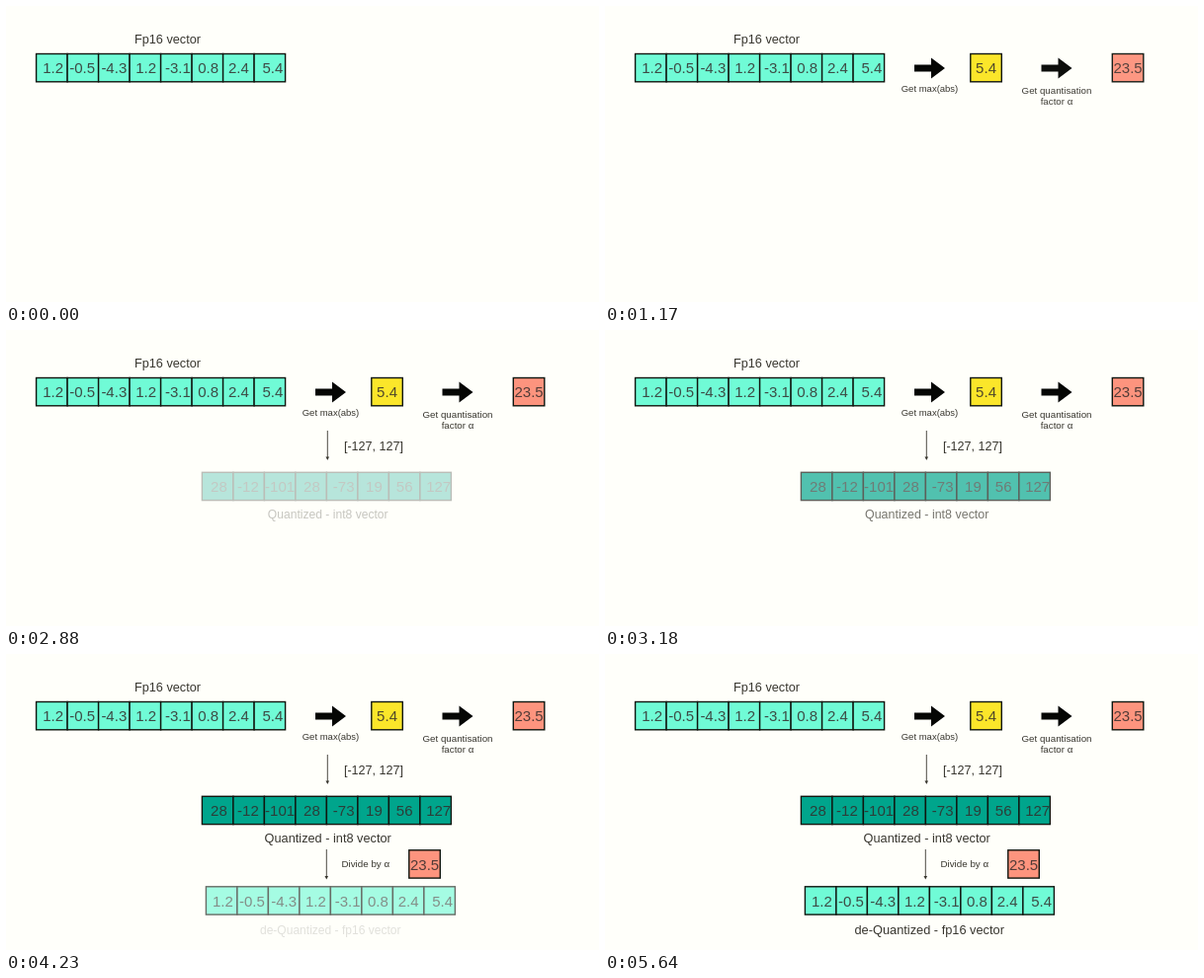
Animation, 600 px wide and 300 px high, one loop 5.67 s. Source, as an HTML page with a canvas:

```html
<!DOCTYPE html>
<html lang="en">
<head>
<meta charset="utf-8">
<title>Vector quantisation</title>
<style>
html, body { margin: 0; width: 100%; height: 100%; overflow: hidden; background: #fffffa; }
canvas { display: block; width: 600px; height: 300px; }
</style>
</head>
<body>
<canvas id="stage" width="600" height="300"></canvas>
<script>
const main = document.getElementById('stage');
const ctx = main.getContext('2d');
const LOOP = 5670;
const FONT = '"Liberation Sans", Arial, sans-serif';
const PAPER = '#fffffa', INK = '#38362f', EDGE = '#10160f', DIGIT = 'rgba(50, 44, 42, 0.85)';
const MINT = '#70fbd6', GREEN = '#00a58c', YELLOW = '#fbe62a', ORANGE = '#fd947e';
const CELL = 31.5, CELL_HEIGHT = 28.3;
const DIGIT_X = [17, 46.5, 78.7, 111, 143.3, 174, 204.8, 239.3];
const FLOATS = ['1.2', '-0.5', '-4.3', '1.2', '-3.1', '0.8', '2.4', '5.4'];
const INTS = ['28', '-12', '-101', '28', '-73', '19', '56', '127'];

function text(str, x, baseline, size, color = INK) {
  ctx.font = `${size}px ${FONT}`;
  ctx.fillStyle = color;
  ctx.fillText(str, x, baseline);
}

// Labels grow very slightly while they fade in.
function label(str, x, baseline, size, progress = 1) {
  const scale = 0.93 + 0.07 * progress;
  ctx.save();
  ctx.translate(x, baseline - size * 0.36);
  ctx.scale(scale, scale);
  text(str, 0, size * 0.36, size);
  ctx.restore();
}

function box(x, y, fill) {
  ctx.fillStyle = fill;
  ctx.fillRect(x, y, CELL, CELL_HEIGHT);
  ctx.strokeStyle = EDGE;
  ctx.lineWidth = 1.4;
  ctx.strokeRect(x, y, CELL, CELL_HEIGHT);
}

function vector(x, y, values, fill) {
  values.forEach((_, i) => box(x + i * CELL, y, fill));
  values.forEach((value, i) => text(value, x + DIGIT_X[i], y + 19.8, 15, DIGIT));
}

function scalar(x, y, value, fill) {
  box(x, y, fill);
  text(value, x + CELL / 2, y + 19.8, 15, DIGIT);
}

function blockArrow(x, y) {
  ctx.fillStyle = '#050604';
  ctx.beginPath();
  ctx.moveTo(x, y - 3.4);
  ctx.lineTo(x + 17, y - 3.4);
  ctx.lineTo(x + 17, y - 10.6);
  ctx.lineTo(x + 31, y);
  ctx.lineTo(x + 17, y + 10.6);
  ctx.lineTo(x + 17, y + 3.4);
  ctx.lineTo(x, y + 3.4);
  ctx.fill();
}

function downArrow(x, top, tip) {
  ctx.strokeStyle = ctx.fillStyle = INK;
  ctx.lineWidth = 0.9;
  ctx.beginPath();
  ctx.moveTo(x, top);
  ctx.lineTo(x, tip - 2);
  ctx.stroke();
  ctx.beginPath();
  ctx.moveTo(x - 1.8, tip - 3.5);
  ctx.lineTo(x + 1.8, tip - 3.5);
  ctx.lineTo(x, tip);
  ctx.fill();
}

// start and end of the fade, its curve, and what to draw
const steps = [
  [-1, 0, 1, () => {
    label('Fp16 vector', 163.5, 38.2, 12.7);
    vector(30.6, 48.5, FLOATS, MINT);
  }],
  [20, 580, 1, p => {
    blockArrow(313, 63);
    label('Get max(abs)', 328.5, 87.2, 9.5, p);
    scalar(369.8, 48.5, '5.4', YELLOW);
  }],
  [560, 1190, 1, p => {
    blockArrow(441.5, 63);
    label('Get quantisation', 457, 89, 9.75, p);
    label('factor α', 457, 99.7, 9.75, p);
    scalar(513.3, 48.5, '23.5', ORANGE);
  }],
  [1600, 2290, 1, p => {
    downArrow(325.3, 102, 132);
    label('[-127, 127]', 372, 121.7, 12.6, p);
  }],
  [2670, 3420, 1, p => {
    vector(198.4, 144.3, INTS, GREEN);
    label('Quantized - int8 vector', 325.7, 191, 12.75, p);
  }],
  [3390, 4040, 1, p => {
    downArrow(324.3, 198, 228.5);
    label('Divide by α', 363.8, 216, 9.8, p);
    scalar(407.8, 198.8, '23.5', ORANGE);
  }],
  [3820, 4470, 1, () => vector(202.4, 235.8, FLOATS, MINT)],
  [3970, 4980, 1.4, p => label('de-Quantized - fp16 vector', 328.2, 284.2, 12.8, p)]
];

const backup = document.createElement('canvas');
backup.width = main.width;
backup.height = main.height;
const backupCtx = backup.getContext('2d');

// Keep the picture so far, draw the step in full, then blend the old picture back.
function drawFaded(draw, p) {
  if (p < 1) backupCtx.drawImage(main, 0, 0);
  draw(p);
  if (p < 1) {
    ctx.globalAlpha = 1 - p;
    ctx.drawImage(backup, 0, 0);
    ctx.globalAlpha = 1;
  }
}

function frame(now) {
  const t = now % LOOP;
  ctx.textAlign = 'center';
  ctx.fillStyle = PAPER;
  ctx.fillRect(0, 0, main.width, main.height);
  for (const [start, end, power, draw] of steps) {
    const p = Math.min(1, Math.max(0, (t - start) / (end - start))) ** power;
    if (p > 0) drawFaded(draw, p);
  }
  requestAnimationFrame(frame);
}

requestAnimationFrame(frame);
</script>
</body>
</html>
```
